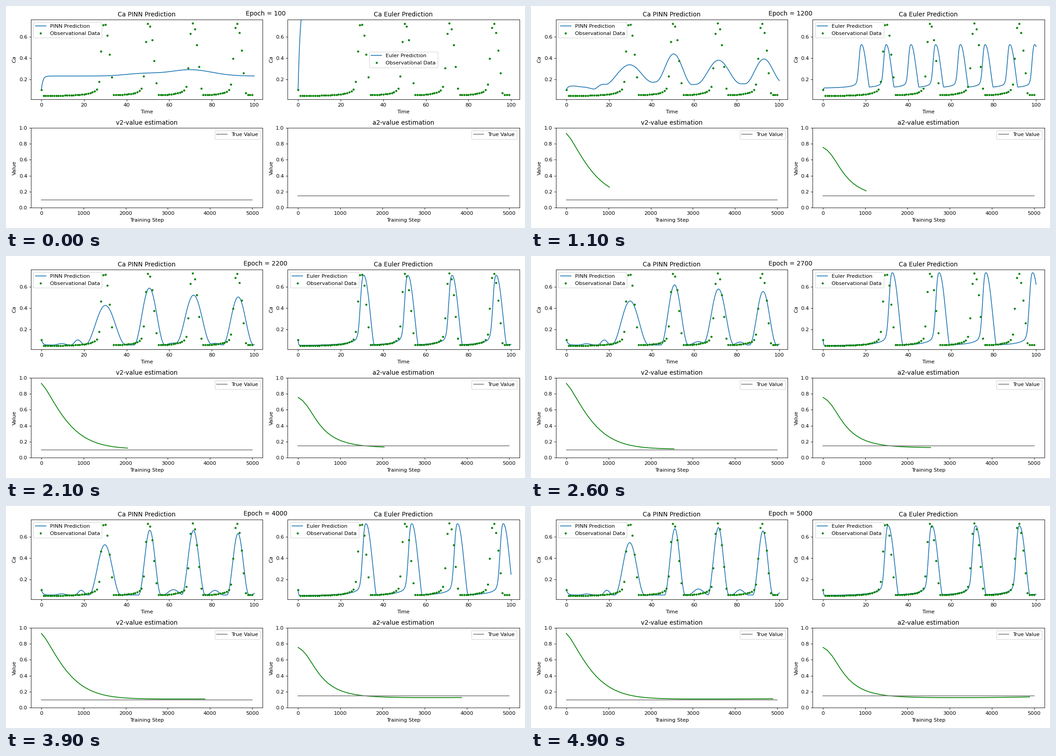
A matplotlib script for the animation above (5 s loop, 1143x490 px).

```python
import numpy as np
import matplotlib.pyplot as plt
from matplotlib.animation import FuncAnimation

W, H = 1143, 490
DPI = H / 6
FRAMES = 50

t = np.linspace(0, 100, 1001)
steps = np.linspace(0, 5000, FRAMES)


def sigmoid(x):
    return 1 / (1 + np.exp(-x))


def ease_through(x, px, py):
    """Join turning points with smooth steps."""
    k = np.clip(np.searchsorted(px, x) - 1, 0, len(px) - 2)
    px, py = np.array(px), np.array(py)
    u = np.clip((x - px[k]) / (px[k + 1] - px[k]), 0, 1)
    return py[k] + (py[k + 1] - py[k]) * u * u * (3 - 2 * u)


def spike(x):
    """Concentration around a spike whose peak is at x = 0."""
    before = x < 0
    low = np.where(before, .0335 + .235 / np.maximum(-x, 3), .05)
    rise = np.exp(-(np.maximum(-x, 0) / 1.85) ** 2.7)
    fall = np.maximum(np.cos(np.pi * np.clip(x, 0, 4.5) / 9), 0) ** 1.3
    return low + (.73 - low) * np.where(before, rise, fall)


def spike_train(x, first, period, top=.73, base=.05, width=1):
    peaks = first + period * np.arange(12)
    c = spike((x - peaks[:, None]) / width).max(axis=0)
    c = base + (c - .05) * (top - base) / .68
    return c + (.1 - c[0]) * np.exp(-x / .2)


def settling(i):
    """Euler curve while the system still runs to a steady level."""
    level = .1 + .9 * np.exp(-i / 8)
    late = min(i / 6, 1)
    n = max(i - 6, 0)
    x = t * (1 + .3 * max(6 - i, 0))
    ring = (.024 + .033 * n) * np.cos(2 * np.pi * (x - 8.5) / 9) \
        * np.exp(-np.abs(x - 8.5) / (2 * 3 ** n))
    slow = .1 * (1 - np.exp(-x / .6)) + (level - .2 + ring) * sigmoid((x - 5) / 1.1)
    fast = (level - .1) * (1 - np.exp(-t / 1.05))
    return .1 + late * slow + (1 - late) * fast


def euler(i):
    if i < 10:
        return settling(i)
    period = np.interp(i, [10, 16, 20, 26, 34, 43, 49],
                       [10.5, 17.2, 20.5, 21.97, 22.05, 21.07, 20.55])
    return spike_train(t, first=1.8 + 1.4 * period, period=period,
                       top=.295 + .02 * period,
                       base=.05 + .1 * np.exp((10.5 - period) / 3.2),
                       width=min(1.06, period / 14))


def hump(x, centre, height, width):
    u = np.clip((x - centre) / width, -1, 1)
    return height * np.cos(np.pi / 2 * u) ** 2


# Humps of the network output, (centre, height, width) first and at the end
HUMPS = [
    ((30.2, .315, 11), (29.7, .515, 6.6)),
    ((50.6, .495, 8.5), (51, .642, 4.5)),
    ((71.5, .39, 10.3), (71.4, .665, 4.4)),
    ((92.5, .38, 8.5), (92.3, .63, 4.4)),
    ((9.5, .015, 4), (9.5, .01, 4)),
    ((16.2, .05, 3.5), (19.3, .045, 2.8)),
    ((62, 0, 5), (62, .063, 5)),
    ((81.5, 0, 4), (81.5, .055, 4)),
    ((101, -.01, 2.5), (101, .035, 2.5)),
]

onset = np.exp(-t / .7)
early = .23 - .13 * onset + .06 * np.exp(-((t - 70) / 14) ** 2) \
    + .022 * np.exp(-((t - 47) / 11) ** 2)
wavy = ease_through(t, [2.8, 13, 24.6, 37, 49, 58.8, 71, 83, 95, 104],
                    [.222, .162, .33, .275, .34, .247, .319, .262, .362, .285])
wavy += (.1 - wavy) * onset


def fitted(i):
    left = np.exp((16 - i) / 14)
    c = .05 + .05 * onset
    for first, last in HUMPS:
        c += hump(t, *(left * np.array(first) + (1 - left) * np.array(last)))
    return c


def pinn(i):
    if i <= 6:
        return early + (wavy - early) * i / 6
    if i < 16:
        return wavy + (fitted(16) - wavy) * (i - 6) / 10
    return fitted(i)


v2 = .108 + .822 * np.exp(-(steps / 678) ** 1.3) + .005 * (steps / 5000) ** 3
a2 = .126 + .0026 * (steps / 1000 - 3) ** 2 + .635 * sigmoid((185 - steps) / 110) ** .28

obs_t = np.arange(100.0)
obs = spike_train(obs_t, first=29.5, period=20.73)

fig, axes = plt.subplots(2, 2, figsize=((W + .01) / DPI, (H + .01) / DPI), dpi=DPI)


def prediction(ax, name):
    line, = ax.plot([], [], label=f"{name} Prediction")
    ax.plot(obs_t, obs, "g.", label="Observational Data")
    ax.set(title=f"Ca {name} Prediction", xlabel="Time", ylabel="$Ca$",
           xlim=(-4.95, 103.95), ylim=(.0075, .7643),
           xticks=range(0, 101, 20), yticks=[.2, .4, .6])
    ax.legend()
    return line


def estimate(ax, name, true):
    line, = ax.plot([], [], "g")
    ax.plot([0, 5000], [true, true], color="gray", label="True Value")
    ax.set(title=f"{name}-value estimation", xlabel="Training Step", ylabel="Value",
           xlim=(-250, 5250), ylim=(0, 1), xticks=range(0, 5001, 1000))
    ax.legend(loc="upper right")
    return line


pinn_line = prediction(axes[0, 0], "PINN")
euler_line = prediction(axes[0, 1], "Euler")
v2_line = estimate(axes[1, 0], "v2", .1)
a2_line = estimate(axes[1, 1], "a2", .15)
fig.tight_layout()
heading = fig.suptitle("")


def update(i):
    heading.set_text(f"Epoch = {100 * (i + 1)}")
    pinn_line.set_data(t, pinn(i))
    euler_line.set_data(t, euler(i))
    v2_line.set_data(steps[:i], v2[:i])
    a2_line.set_data(steps[:i], a2[:i])
    return pinn_line, euler_line, v2_line, a2_line


anim = FuncAnimation(fig, update, frames=FRAMES, interval=100, repeat=True,
                     repeat_delay=0, init_func=lambda: update(0), blit=False)
plt.show()
```
